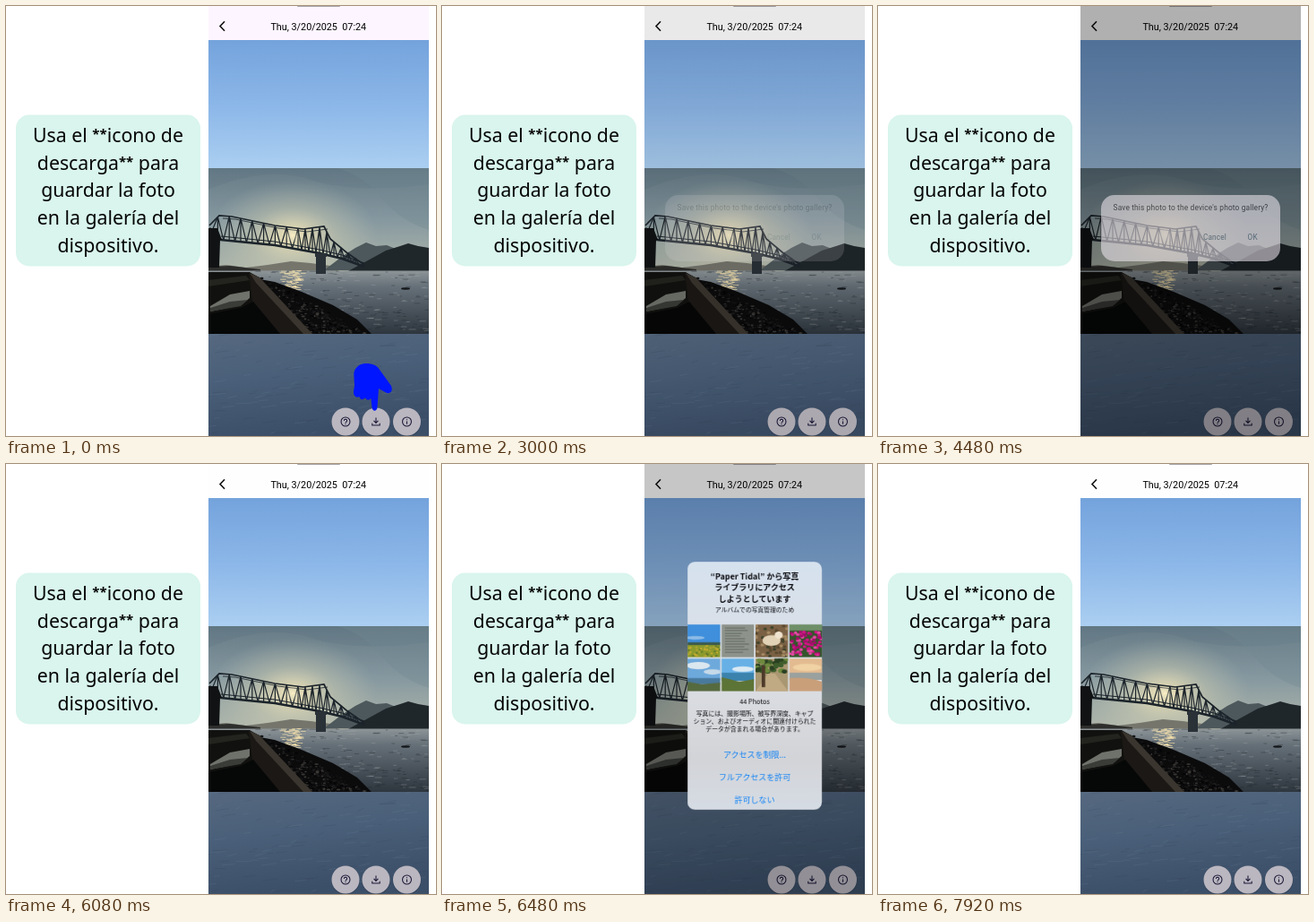
Animation of 480 by 480 pixels, one loop 8000 ms. Source, as an HTML page:

```html
<!DOCTYPE html>
<html lang="es">
<head>
<meta charset="utf-8">
<title>Guardar la foto</title>
<style>
html, body { margin: 0; width: 100%; height: 100%; overflow: hidden; background: #fff; }
svg { display: block; width: 100vw; height: 100vh; }
text { text-anchor: middle; white-space: pre; }
.note { font: 21.3px "Noto Sans", "Open Sans", sans-serif; fill: #050505; }
.star { font-size: 15px; font-weight: 700; baseline-shift: 4.5px; }
.ui { font-family: Roboto, sans-serif; }
.jp { font-family: "Noto Sans CJK JP", "Noto Sans CJK", sans-serif; fill: #0c0c10; }
#hand, #alert { transform-box: fill-box; transform-origin: center; }
#ask, #askDim, #alert, #alertDim { opacity: 0; }
</style>
</head>
<body>
<svg viewBox="0 0 480 480" id="stage">
  <defs>
    <linearGradient id="topBand" x2="0" y2="1">
      <stop stop-color="#74a3dc"/><stop offset=".5" stop-color="#8bb6e8"/><stop offset="1" stop-color="#abcff1"/>
    </linearGradient>
    <linearGradient id="lowBand" x2=".25" y2="1">
      <stop stop-color="#55687f"/><stop offset=".45" stop-color="#4a5f79"/><stop offset="1" stop-color="#3c4f68"/>
    </linearGradient>
    <linearGradient id="sky" x2="0" y2="1">
      <stop stop-color="#667b86"/><stop offset=".3" stop-color="#84979f"/><stop offset=".6" stop-color="#adb5aa"/><stop offset=".64" stop-color="#dcc897"/><stop offset="1" stop-color="#dcc897"/>
    </linearGradient>
    <linearGradient id="sea" x2="0" y2="1">
      <stop stop-color="#8d9598"/><stop offset=".25" stop-color="#667078"/><stop offset="1" stop-color="#2d353d"/>
    </linearGradient>
    <linearGradient id="glass" x2="0" y2="1">
      <stop stop-color="#d6e2ef"/><stop offset=".45" stop-color="#dcdfe4"/><stop offset=".8" stop-color="#d3d4d8"/><stop offset="1" stop-color="#d6dce4"/>
    </linearGradient>
    <radialGradient id="glow">
      <stop stop-color="#fff8d8"/><stop offset=".12" stop-color="#f3e6b8" stop-opacity=".8"/>
      <stop offset=".5" stop-color="#dcd7b4" stop-opacity=".38"/><stop offset="1" stop-color="#cfd0b8" stop-opacity="0"/>
    </radialGradient>
    <clipPath id="phone"><rect x="226" width="246" height="480"/></clipPath>
    <clipPath id="photoBox"><rect x="226" y="181" width="246" height="185"/></clipPath>
    <clipPath id="thumb"><rect width="36.4" height="36.6"/></clipPath>
  </defs>

  <rect width="480" height="480" fill="#fff"/>
  <rect x="11" y="121.5" width="206" height="169" rx="15" fill="#d9f5ed"/>
  <g id="note"></g>

  <g clip-path="url(#phone)">
    <rect id="head" x="226" width="246" height="39" fill="#fdf5ff"/>
    <rect x="325" y="-1" width="48" height="2" rx="1" fill="#a9a6ac"/>
    <path d="M244 17.3L239 22.5L244 27.7" fill="none" stroke="#111" stroke-width="1.6"/>
    <text class="ui" x="348.8" y="27" font-size="10.8">Thu, 3/20/2025  07:24</text>
    <rect x="226" y="38" width="246" height="143" fill="url(#topBand)"/>
    <rect x="226" y="366" width="246" height="114" fill="url(#lowBand)"/>
    <g id="streaks" stroke-linecap="round"></g>
    <g id="photo" clip-path="url(#photoBox)"></g>
    <g id="buttons" fill="none" stroke="#1b1838" stroke-width="1.15"></g>

    <rect id="askDim" x="226" width="246" height="480" fill="#000"/>
    <g id="ask" class="ui">
      <rect x="249" y="211" width="200" height="74" rx="15" fill="#ede6ee"/>
      <text x="349" y="228" font-size="8.4" letter-spacing=".14" fill="#29262c">Save this photo to the device's photo gallery?</text>
      <g font-size="8.2" letter-spacing=".2" fill="#48617a">
        <text x="376" y="261">Cancel</text>
        <text x="418.2" y="261">OK</text>
      </g>
    </g>

    <rect id="alertDim" x="226" width="246" height="480" fill="#000"/>
    <g id="alert">
      <rect x="274" y="109" width="150" height="277" rx="8.5" fill="url(#glass)"/>
      <g id="alertText" class="jp"></g>
      <g id="thumbs"></g>
    </g>
  </g>

  <path id="hand" fill="#0016ff" d="M388.5 414C387 405 394 399 402 399C409 399 414 401 417 406L430 424C432 429 430 433 425 432L416 427L414.5 448C414 453 409 453 408.5 448L407.5 438C405 441 402 440 401 437C399 440 395 440 394.5 436C391 438 387.5 435 388 430L389 424Z"/>
</svg>

<script>
const $ = id => document.getElementById(id);
const fill = (id, parts) => { $(id).innerHTML = parts.join(""); };

let seed = 7;
function rnd(a = 0, b = 1) {
  seed = (seed * 16807) % 2147483647;
  return a + (b - a) * seed / 2147483647;
}
const many = (n, fn) => Array.from({ length: n }, (_, i) => fn(i)).join("");
const shape = (d, color, extra = "") => `<path d="${d}" fill="${color}" ${extra}/>`;
const box = (x, y, w, h, color) => `<rect x="${x}" y="${y}" width="${w}" height="${h}" fill="${color}"/>`;
const blob = (x, y, rx, ry, color) => `<ellipse cx="${x}" cy="${y}" rx="${rx}" ry="${ry}" fill="${color}"/>`;
const dash = (x, y, w, color, o, dy = 0) =>
  `<path d="M${x} ${y}l${w} ${dy}" stroke="${color}" stroke-opacity="${o}" stroke-width=".8"/>`;

// Caption
const lines = ["Usa el **icono de", "descarga** para", "guardar la foto", "en la galería del", "dispositivo."];
fill("note", lines.map((s, i) =>
  `<text class="note" x="114" y="${152 + i * 30.7}">${s.replace("**", '<tspan class="star">**</tspan>')}</text>`));

// Faint texture on the lower band
fill("streaks", [many(130, () =>
  dash(rnd(226, 465), rnd(368, 478), rnd(4, 18), rnd() < .5 ? "#8296ac" : "#2c3c50", .18, rnd(-3, 0)))]);

// Height on a polyline at x
function at(pts, x) {
  let i = 1;
  while (i < pts.length - 1 && pts[i][0] < x) i++;
  const [a, b] = [pts[i - 1], pts[i]];
  return a[1] + (b[1] - a[1]) * (x - a[0]) / (b[0] - a[0]);
}

function bridge() {
  const top = [[227, 245], [238, 234], [252, 235], [300, 245], [332, 249], [355, 246], [362, 260], [380, 275], [400, 289]];
  const low = [[227, 248], [240, 261], [300, 267], [350, 276], [375, 282], [400, 291]];
  const chord = (pts, dx = 0, dy = 0) => "M" + pts.map(([x, y]) => `${x + dx} ${y + dy}`).join("L");
  let web = "";
  for (let x = 230, up = true; x < 392; up = !up) {
    const step = x < 320 ? 6.4 : 4, n = x + step;
    const [a, b] = up ? [low, top] : [top, low];
    web += `M${x} ${at(a, x)}L${n} ${at(b, n)}`;
    if (up) web += `V${at(low, n)}`;
    x = n;
  }
  const line = (d, w) => `<path d="${d}" fill="none" stroke="#1c242b" stroke-width="${w}"/>`;
  return line(chord(top), 1.7) + line(chord(top.slice(1, 6), 4, 3), .8) + line(chord(low), 2.6) +
    line(chord(low.slice(1), 0, -4), 1.1) + line(web, 1.2) +
    shape("M345 276h13v4h-1v19h-11v-19h-1z", "#2a3238") +
    shape("M226 248h10l5 13h-2l-1 31h-12z", "#101214");
}

function rocks() {
  const tones = ["#050506", "#0f0f10", "#1d1c1c", "#151517", "#3a3835"];
  return many(300, () => {
    const t = Math.sqrt(rnd()), y = 303 + 64 * t;
    const x = rnd(278 + 60 * t, 288 + 118 * t);
    return blob(x, y, rnd(.7, 2.5), rnd(.5, 1.3), tones[Math.floor(rnd(0, 5))]);
  });
}

fill("photo", [
  box(226, 181, 246, 185, "url(#sky)"),
  shape("M226 181H472V199Q390 210 340 194T226 205Z", "#536a77", 'opacity=".2"'),
  shape("M370 181H472V250Q440 240 420 215T370 181Z", "#71868f", 'opacity=".35"'),
  blob(320, 256, 94, 62, "url(#glow)"),
  shape("M226 291L246 289L268 292L292 289L318 285L340 287L370 291V298H226Z", "#75756c"),
  shape("M355 295L376 279L390 270L402 264L413 268L425 267L440 273V296Z", "#4d585c"),
  shape("M380 297L404 284L424 273L440 268L449 265L460 268L472 270V297H380Z", "#20272b"),
  shape("M226 291L250 290L284 294V299H226Z", "#2e2f2c"),
  box(226, 295.5, 246, 71, "url(#sea)"),
  many(230, () => {
    const y = rnd(296, 364);
    return dash(rnd(270, 470), y, rnd(2, 8), rnd() < .42 ? "#a1a6a8" : "#20272e", .45);
  }),
  many(60, () => {
    const y = rnd(295, 317);
    return dash(317 + rnd(-13, 12) * (1.1 - (y - 295) / 40), y, rnd(2, 7), "#ffe9b0", .85);
  }),
  bridge(),
  blob(320, 256, 9, 9, "url(#glow)"),
  blob(446, 315.5, 5, 1.2, "#14171a"),
  shape("M278 304L300 308L330 319L365 334L392 350L408 366H326Z", "#0b0b0c"),
  rocks(),
  shape("M226 297L272 297L284 304V366H226Z", "#11120f"),
  shape("M226 306L268 301L272 306L226 313Z", "#24241f"),
  shape("M228 335L250 322L272 318V326L262 334L228 341Z", "#6f716b"),
  shape("M228 337L250 330L270 328L262 335L228 341Z", "#3a3c38"),
  shape("M271 298L283 303L342 366H300L275 330Z", "#1b1815"),
  shape("M272 298L283 303L342 366H332L279 309Z", "#3a352e"),
  shape("M226 344L262 337L276 330L306 366H226Z", "#060707")
]);

// Round buttons
const icons = [
  [379, '<circle r="5.4"/><path d="M-1.8-1.2a1.8 1.7 0 1 1 2.7 1.5q-.9.5-.9 1.3M0 2.5v1.1"/>'],
  [413, '<path d="M0-5v6.4M-2.7-1.2L0 1.6L2.7-1.2M-4.6 1.8v2.6h9.2v-2.6"/>'],
  [447.5, '<circle r="5.4"/><path d="M0-.6v3.5M0-3v1.2"/>']
];
fill("buttons", icons.map(([x, art]) =>
  `<g transform="translate(${x} 464)"><circle cy="1" r="15.8" fill="#24344a" fill-opacity=".35" stroke="none"/>
   <circle r="15.5" fill="#bbb7c0" stroke="none"/><g transform="scale(.92)">${art}</g></g>`));

// System alert
const blue = 'fill="#0f82f6"', bold = 'font-weight="700"';
const copy = [
  [129, 9, "“Paper Tidal” から写真", bold],
  [141.3, 9, "ライブラリにアクセス", bold],
  [153.6, 9, "しようとしています", bold],
  [165, 6.8, "アルバムでの写真管理のため", ""],
  [268, 7.3, "44 Photos", 'font-weight="500"'],
  [281.3, 6.9, "写真には、撮影場所、被写界深度、キャプ", ""],
  [290, 6.9, "ション、およびオーディオに関連付けられた", ""],
  [298.7, 6.9, "データが含まれる場合があります。", ""],
  [328, 9, "アクセスを制限...", blue],
  [353, 9, "フルアクセスを許可", blue],
  [378, 9, "許可しない", blue]
];
fill("alertText", copy.map(([y, size, s, extra]) =>
  `<text x="349" y="${y}" font-size="${size}" ${extra}>${s}</text>`));

const dots = (n, y0, y1, colors, r = 2) => many(n, i =>
  blob(rnd(0, 36), rnd(y0, y1), r, r * .8, colors[i % colors.length]));
const scenes = [
  box(0, 0, 37, 22, "#3f8fdc") + blob(9, 15, 10, 2, "#8dbbe6") + box(0, 20, 37, 4, "#3c5a4c") +
    box(0, 23, 37, 14, "#8c9a2c") + dots(45, 24, 36, ["#c9ad2e", "#647a2a", "#b4a535"], 1.3),
  box(0, 0, 37, 37, "#8d938a") + many(10, i => dash(4, 4 + i * 3, rnd(16, 29), "#4d544e", .8)),
  box(0, 0, 37, 37, "#7b6144") + dots(50, 0, 36, ["#5a4a30", "#a58a62", "#3f432c"]) +
    blob(18, 18, 10, 6, "#e3d3b6") + blob(26, 12, 4.5, 4, "#efe3cf"),
  box(0, 0, 37, 37, "#35552c") + box(0, 0, 37, 7, "#6f8f68") + dots(75, 8, 34, ["#d01585", "#a90c6e", "#e649a5"]),
  box(0, 0, 37, 24, "#6ea9dc") + blob(12, 8, 13, 4, "#dbe7ef") + blob(28, 15, 10, 3, "#c5d9e8") +
    box(0, 22, 37, 7, "#49799c") + shape("M0 26L16 29L37 27V37H0Z", "#566a3f"),
  box(0, 0, 37, 18, "#66b0e6") + blob(24, 12, 12, 3, "#d9e9f3") + box(0, 16, 37, 9, "#3b83ad") +
    shape("M0 21L20 26L37 23V37H0Z", "#5d7437"),
  box(0, 0, 37, 37, "#a99772") + dots(45, 0, 15, ["#3d5c2b", "#6e8a3d", "#2a4022"], 3) +
    shape("M0 37L14 17H22L37 37Z", "#c0aa83") + box(7, 8, 4, 24, "#4d3a29"),
  box(0, 0, 37, 17, "#e3bb91") + blob(20, 10, 16, 4, "#f0d2a4") + box(0, 16, 37, 8, "#9aa19e") +
    shape("M0 22Q20 20 37 26V37H0Z", "#c99f7a")
];
fill("thumbs", scenes.map((art, i) =>
  `<g transform="translate(${274 + (i % 4) * 37.9} ${179 + (i >> 2) * 38})" clip-path="url(#thumb)">${art}</g>`));

// Motion: rows of [ms, value, easing to the next row]
const LOOP = 8000;
function play(id, prop, rows) {
  const all = [[0, rows[0][1]], ...rows, [LOOP, rows[rows.length - 1][1]]];
  $(id).animate(
    all.map(([ms, v, easing = "linear"]) => ({ offset: ms / LOOP, [prop]: v, easing })),
    { duration: LOOP, iterations: Infinity });
}
const out = "cubic-bezier(.2,.6,.3,1)", sink = "cubic-bezier(.32,0,.67,0)";
const fade = (id, peak, a, b, c, d, leave) =>
  play(id, "opacity", [[a, 0, out], [b, peak], [c, peak, leave], [d, 0]]);

play("head", "fill", [[1359, "#fdf5ff"], [1360, "#fffeff"]]);
play("hand", "transform", [[490, "scale(1)", "ease-in-out"], [860, "scale(1.19)", "ease-in"], [1320, "scale(0)"]]);
fade("askDim", .54, 2980, 3400, 4300, 4540, sink);
fade("ask", 1, 2980, 3400, 4300, 4540, sink);
fade("alertDim", .22, 6085, 6460, 7370, 7800, "ease-in-out");
fade("alert", 1, 6085, 6460, 7370, 7800, "ease-in-out");
play("alert", "transform", [[6085, "scale(1.15)", out], [6460, "scale(1)"], [7900, "scale(1)"]]);
</script>
</body>
</html>
```
